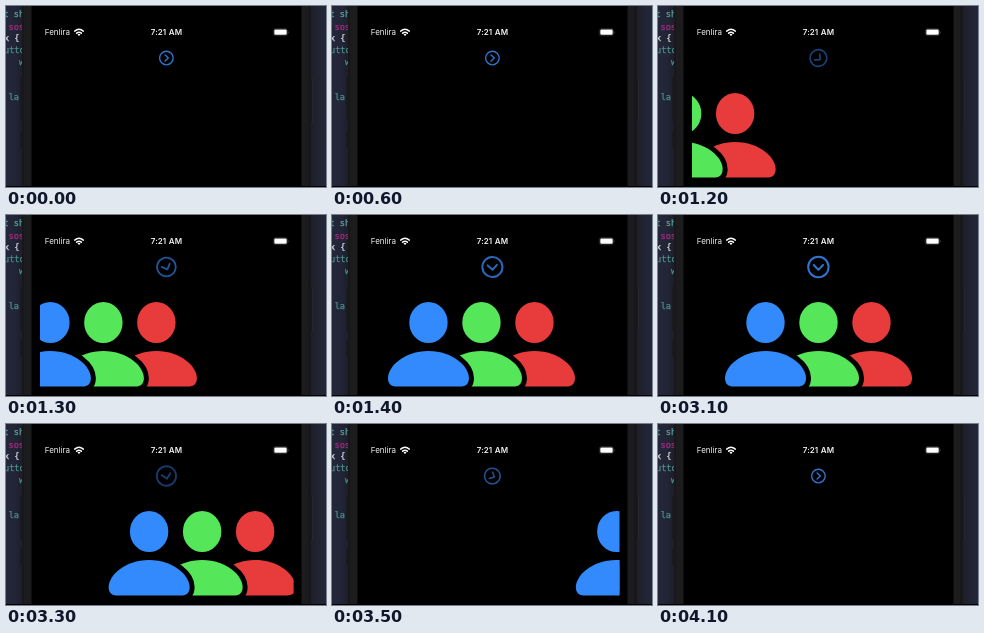
Animation, 320 px wide and 181 px high, one loop 5700 ms. Source, as an HTML page:

```html
<!DOCTYPE html>
<html lang="en">
<head>
<meta charset="utf-8">
<title>Toggle transition</title>
<style>
  html, body { margin: 0; width: 100%; height: 100%; overflow: hidden; background: #000; }
  svg { display: block; width: 100vw; height: 100vh; }
  .code { font: 8.6px "DejaVu Sans Mono", monospace; stroke-width: .25; }
  .status { font: 8px Inter, Roboto, sans-serif; fill: #f2f2f2; }
  .clock { font-weight: 600; text-anchor: middle; word-spacing: .5px; letter-spacing: .06px; }
  .line { fill: none; stroke-linecap: round; stroke-linejoin: round; }
</style>
</head>
<body>
<svg viewBox="0 0 320 181" preserveAspectRatio="none">
  <defs>
    <linearGradient id="desk">
      <stop offset="0" stop-color="#24273a"/>
      <stop offset=".03" stop-color="#222536"/>
      <stop offset=".055" stop-color="#1b1c26"/>
      <stop offset=".95" stop-color="#1d1e28"/>
      <stop offset=".98" stop-color="#212433"/>
      <stop offset="1" stop-color="#24273a"/>
    </linearGradient>
    <clipPath id="row"><rect x="34" y="80" width="253.5" height="100"/></clipPath>
    <path id="torso" d="M-40.5 163C-40.5 152-25 136 0 136S40.5 152 40.5 163C40.5 169 37.5 171.5 31.5 171.5H-31.5C-37.5 171.5-40.5 169-40.5 163Z"/>
    <ellipse id="head" cy="107.5" rx="19.2" ry="20.6"/>
  </defs>

  <!-- editor behind the phone -->
  <rect width="320" height="180" fill="url(#desk)"/>
  <g class="code">
    <text x="-2.5" y="11" fill="#58a3a0" stroke="#58a3a0">t sh</text>
    <text x="2.5" y="23.5" fill="#a92a80" stroke="#a92a80">sos</text>
    <text x="-2" y="35" fill="#d8d8dc" stroke="#d8d8dc">x {</text>
    <text x="-2" y="47" fill="#4b918b" stroke="#4b918b">utto</text>
    <text x="13" y="59" fill="#4b918b" stroke="#4b918b">w</text>
    <text x="2.7" y="93.5" fill="#4b918b" stroke="#4b918b">la</text>
  </g>

  <!-- phone -->
  <g fill="#191a20">
    <rect x="14" y="72" width="3" height="43" rx="1"/>
    <rect x="14" y="125" width="3" height="17" rx="1"/>
    <rect x="303" y="72" width="3.5" height="45" rx="1" stroke="#30313a" stroke-width=".5"/>
  </g>
  <rect x="16" width="289" height="180" fill="#18181b"/>
  <rect x="18" width="284" height="180" fill="#1c1c1e"/>
  <rect x="25.5" width="270" height="180" fill="#000"/>
  <rect y="180" width="320" height="1" fill="#000"/>

  <!-- status bar -->
  <text class="status" x="38.8" y="29.2">Fenlira</text>
  <text class="status clock" x="160.5" y="29.2">7:21 AM</text>
  <path class="line" d="M68.7 25.1Q73 21.5 77.3 25.1M70.6 27.2Q73 25.2 75.4 27.2" stroke="#fff" stroke-width="1.5"/>
  <path d="M71.5 28.4Q73 27.3 74.5 28.4L73 30Z" fill="#fff"/>
  <rect x="267.3" y="22.7" width="14.2" height="7" rx="2" fill="none" stroke="#444" stroke-width=".6"/>
  <rect x="268.3" y="23.6" width="12.4" height="5.2" rx="1.1" fill="#fff"/>
  <path d="M282.4 25Q283.8 26.2 282.4 27.4Z" fill="#555"/>

  <!-- toggle -->
  <g id="toggle" class="line" stroke-width="1.35">
    <circle r="6.8"/>
    <path d="M-1.3-3.1L1.9 0L-1.3 3.1"/>
  </g>

  <g clip-path="url(#row)"><g id="people"></g></g>
</svg>
<script>
  const LOOP = 5700, STEP = 100, MOVE = 500;
  const SHOW = 963, HIDE = 3182;
  const TRAVEL = 253;
  const toggle = document.getElementById("toggle");
  const people = document.getElementById("people");

  // Back to front: each torso cuts a gap into the one behind it.
  people.innerHTML = [[213.5, "#e83c3c"], [160.5, "#55e65a"], [107.5, "#338afc"]]
    .map(([x, color]) => `<g transform="translate(${x})" fill="${color}">
      <use href="#torso" stroke="#000" stroke-width="10"/>
      <use href="#torso"/><use href="#head"/></g>`)
    .join("");

  const clamp = v => Math.min(1, Math.max(0, v));
  const ease = v => v * v * (3 - 2 * v);
  const progress = (t, start) => ease(clamp((t - start) / MOVE));

  // Dimmed while pressed, then fading back.
  function press(t, start) {
    const u = t - start;
    return u < 0 ? 1 : 0.5 + 0.5 * clamp((u - 200) / 300);
  }

  function draw(t) {
    const shown = progress(t, SHOW);
    const hidden = progress(t, HIDE);
    const open = shown - hidden;
    const x = TRAVEL * (shown - 1 + hidden);
    people.setAttribute("transform", `translate(${x})`);
    toggle.setAttribute("transform",
      `translate(160.4 52) rotate(${90 * open}) scale(${1 + open / 2})`);
    toggle.setAttribute("stroke", "#3074d0");
    toggle.setAttribute("opacity", press(t, SHOW) * press(t, HIDE));
  }

  function tick() {
    const t = performance.now() % LOOP;
    draw(Math.floor(t / STEP) * STEP);
    requestAnimationFrame(tick);
  }
  tick();
</script>
</body>
</html>
```
